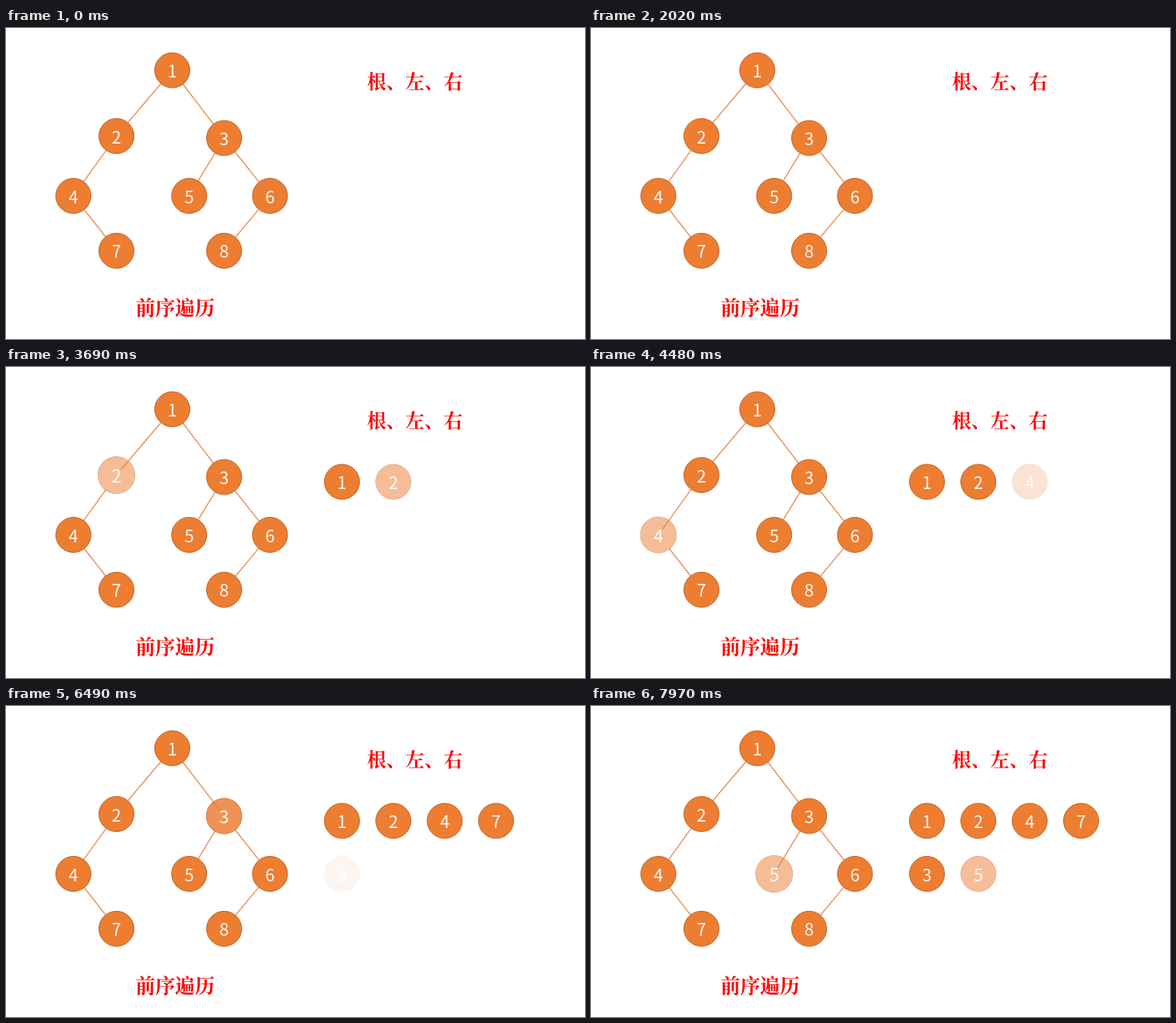
An HTML page for the animation above (8000 ms loop, 726 by 390 pixels).

```html
<!DOCTYPE html>
<html lang="zh-CN">
<head>
<meta charset="utf-8">
<title>前序遍历</title>
<style>
  html, body { margin: 0; width: 100%; height: 100%; overflow: hidden; background: #fff; }
  svg { display: block; width: 100%; height: 100%; }
  text { text-anchor: middle; }
  line { stroke: #e9905c; stroke-width: 1.4; }
  .node circle { fill: #ed7d31; stroke: #bd652c; stroke-width: 1; }
  .node text { fill: #fef6f1; font: 21.5px "Noto Sans CJK SC", "Noto Sans CJK", Lato, sans-serif; }
  .label text { fill: #f00; font-weight: 700; font-family: "Noto Serif CJK SC", "Noto Sans CJK SC", "Noto Sans CJK", serif; }
</style>
</head>
<body>
<svg viewBox="0 0 726 390"></svg>
<script>
const LOOP = 8000, STEP = 1071, PULSE = 950, RADIUS = 22;
const svg = document.querySelector('svg');

function add(parent, tag, attrs, text = '') {
  const el = document.createElementNS('http://www.w3.org/2000/svg', tag);
  for (const key in attrs) el.setAttribute(key, attrs[key]);
  el.textContent = text;
  return parent.appendChild(el);
}

function addNode(value, x, y) {
  const el = add(svg, 'g', { class: 'node' });
  add(el, 'circle', { cx: x, cy: y, r: RADIUS });
  add(el, 'text', { x, y: y + 9 }, value);
  return { el, x, y };
}

function addLabel(text, x, y, size) {
  const el = add(svg, 'g', { class: 'label' });
  add(el, 'text', { x, y: y + size * .38, 'font-size': size }, text);
  return { el, x, y };
}

// Runs from the parent's rim to a little inside the child.
function addEdge(parent, child) {
  const dx = child.x - parent.x, dy = child.y - parent.y;
  const rim = RADIUS / Math.hypot(dx, dy);
  add(svg, 'line', {
    x1: parent.x + dx * rim, y1: parent.y + dy * rim,
    x2: child.x - dx * rim * .4, y2: child.y - dy * rim * .4
  });
}

const node = (value, x, y, ...children) => ({ value, x, y, children });
const preorder = root => [root, ...root.children.flatMap(preorder)];

const root = node(1, 208.5, 53,
  node(2, 138.5, 135.5,
    node(4, 84.5, 210.5,
      node(7, 138.5, 279.3))),
  node(3, 273.5, 138,
    node(5, 229.7, 210.5),
    node(6, 331, 210.5,
      node(8, 273.5, 279.3))));

const nodes = preorder(root);
nodes.forEach(parent => parent.children.forEach(child => addEdge(parent, child)));
const visited = nodes.map(({ value, x, y }) => addNode(value, x, y));
const output = nodes.map(({ value }, i) =>
  addNode(value, 421.3 + i % 4 * 64.4, 144 + Math.floor(i / 4) * 66.5));

const title = addLabel('前序遍历', 212, 350.5, 24.8);
const rule = addLabel('根、左、右', 512.8, 67, 24);
const pulsed = [title, rule, ...visited];

const clamp = v => Math.min(1, Math.max(0, v));
const phase = (time, index) => clamp((time - index * STEP) / PULSE);

// Fades to half and swells by 5 %, then returns.
function pulse({ el, x, y }, p) {
  const toEnd = Math.min(p, 1 - p);
  const scale = 1 + .1 * toEnd;
  el.setAttribute('opacity', 1 - Math.min(.5, toEnd * 2.5));
  el.setAttribute('transform', `translate(${x} ${y}) scale(${scale}) translate(${-x} ${-y})`);
}

function draw(now) {
  const time = now % LOOP;
  pulsed.forEach((item, i) => pulse(item, phase(time, i)));
  output.forEach((item, i) => item.el.setAttribute('opacity', phase(time, i + 2)));
}

let start;
function frame(now) {
  start ??= now;
  draw(now - start);
  requestAnimationFrame(frame);
}
draw(0);
requestAnimationFrame(frame);
</script>
</body>
</html>
```
